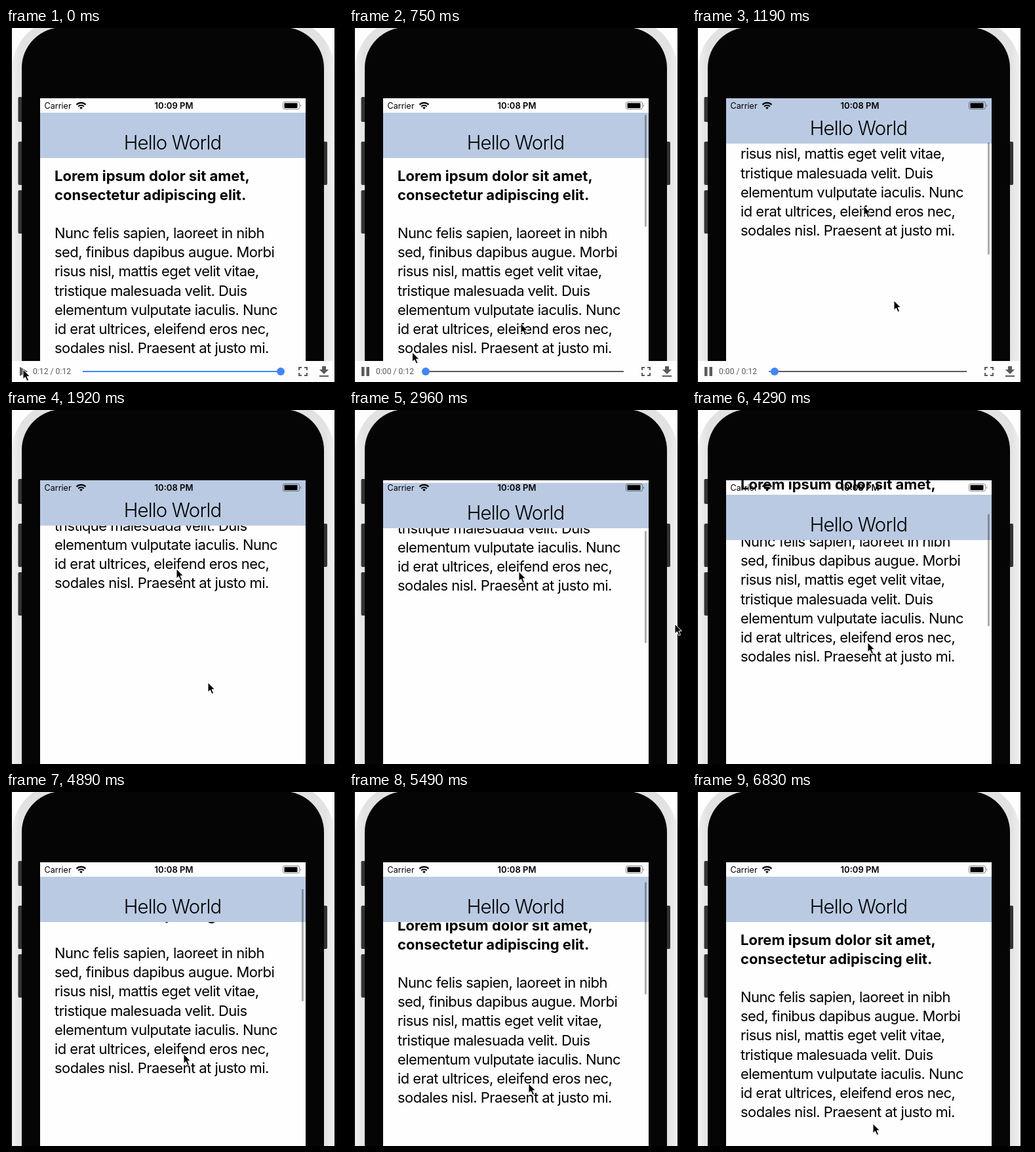
Write an HTML page that moves like this. It is 514 px wide and 539 px high and loops after 8 s.

```html
<!DOCTYPE html>
<html lang="en">
<head>
<meta charset="utf-8">
<title>Collapsing header</title>
<style>
  html, body { margin: 0; width: 100%; height: 100%; overflow: hidden; background: #000; }
  svg { display: block; width: 100%; height: 100%; }
  text { font-family: Inter, "Open Sans", sans-serif; font-optical-sizing: none; white-space: pre; }
  .body { font-size: 22px; letter-spacing: -.54px; }
  .bold { font-size: 22px; font-weight: 700; }
  .title { font-size: 29.3px; font-weight: 350; letter-spacing: -.8px; text-anchor: middle; }
  .carrier { font-size: 12.6px; }
  .clock { font-size: 13px; font-weight: 600; text-anchor: middle; }
  .time { font: 12.2px Roboto, sans-serif; fill: #5a5a5a; }
</style>
</head>
<body>
<svg viewBox="0 0 514 539">
  <defs>
    <linearGradient id="rim">
      <stop offset="0" stop-color="#f1f1f1"/>
      <stop offset=".03" stop-color="#e2e2e2"/>
      <stop offset=".97" stop-color="#e2e2e2"/>
      <stop offset="1" stop-color="#f1f1f1"/>
    </linearGradient>
    <clipPath id="screen"><path d="M52 107H457V539H52z"/></clipPath>
    <path id="arrow" d="M0 0V14.5L3.4 11.4L6 17.4L8.6 16.3L6 10.4H10.4z"
      fill="#000" stroke="#fff" stroke-width="1" stroke-linejoin="round"/>
  </defs>

  <path fill="#fefefe" d="M9 0H501V539H9z"/>
  <rect x="9" y="-14" width="492" height="700" rx="78" fill="url(#rim)"/>
  <g fill="#333">
    <rect x="18.5" y="105" width="8" height="38" rx="2"/>
    <rect x="18.5" y="173" width="8" height="66" rx="2"/>
    <rect x="18.5" y="247" width="8" height="66" rx="2"/>
    <rect x="482" y="173" width="8" height="66" rx="2"/>
  </g>
  <rect x="24" y="-1" width="461" height="700" rx="62" fill="#050505"/>

  <g clip-path="url(#screen)">
    <path fill="#fefefe" d="M52 107H457V539H52z"/>
    <g id="page"></g>
    <g id="header">
      <path fill="#bacae2" d="M52 107H457V176H52z"/>
      <text class="title" x="254" y="163">Hello World</text>
    </g>
    <text class="carrier" x="58.5" y="123">Carrier</text>
    <g fill="none" stroke="#000" stroke-width="2.2">
      <path d="M107.5 116.8A10 10 0 0 1 121.5 116.8"/>
      <path d="M110.2 119.5A6.2 6.2 0 0 1 118.8 119.5"/>
      <path d="M114.5 123.8L112.2 121.4A3.4 3.4 0 0 1 116.8 121.4z" fill="#000" stroke="none"/>
    </g>
    <text class="clock" id="clock" x="256" y="123"></text>
    <rect x="422.5" y="112.5" width="25" height="11" rx="2.5" fill="none" stroke="#000" stroke-opacity=".45"/>
    <rect x="424.5" y="114.2" width="20" height="7.8" rx="1"/>
    <path d="M449 116V120.5Q451 118.2 449 116z" fill-opacity=".55"/>
    <rect id="bar" x="451" width="2.8" height="171" rx="1.4" fill="#000" fill-opacity=".33"/>
  </g>
  <use id="finger" href="#arrow"/>

  <g id="controls">
    <path fill="#fefefe" d="M9 507H501V539H9z"/>
    <path id="button" fill="#5a5a5a"/>
    <text class="time" id="time" x="41" y="527"></text>
    <path stroke="#5a5a5a" stroke-width="2" d="M117 523H419"/>
    <path id="played" stroke="#4285f4" stroke-width="2"/>
    <circle id="knob" cy="523" r="6" fill="#4285f4"/>
    <path fill="none" stroke="#5a5a5a" stroke-width="2"
      d="M447 521V517H451M455 517H459V521M459 525V529H455M451 529H447V525"/>
    <path fill="#5a5a5a" d="M482 515H488V520H492L485 527L478 520H482zM478 529H492V531H478z"/>
  </g>
  <use id="mouse" href="#arrow"/>
</svg>

<script>
const $ = id => document.getElementById(id);
const set = (id, attrs) => {
  for (const name in attrs) $(id).setAttribute(name, attrs[name]);
};
const move = (id, x, y) => set(id, { transform: `translate(${x} ${y})` });
const show = (id, on) => set(id, { visibility: on ? "visible" : "hidden" });

const lines = [
  "Lorem ipsum dolor sit amet,", "consectetur adipiscing elit.", "",
  "Nunc felis sapien, laoreet in nibh", "sed, finibus dapibus augue. Morbi",
  "risus nisl, mattis eget velit vitae,", "tristique malesuada velit. Duis",
  "elementum vulputate iaculis. Nunc", "id erat ultrices, eleifend eros nec,",
  "sodales nisl. Praesent at justo mi."
];
$("page").innerHTML = lines.map((line, i) =>
  `<text class="${i < 2 ? "bold" : "body"}" x="74" y="${232.6 + i * 29.15}">${line}</text>`).join("");

// Keys are [step, value] pairs, linear in between.
const scrollKeys = [[1, 0], [2, 0], [3, 45], [5, 179], [6, 205], [7, 219], [8, 224], [13, 224],
  [14, 220], [18, 162], [23, 112], [25, 90], [31, 22], [32, 6], [33, 0]];
const fingerX = [[1, 262], [5, 262], [14, 259], [18, 262], [23, 268], [31, 274], [40, 276]];
const mouseX = [[0, 26], [1, 26], [5, 308], [11, 308], [14, 497]];
const mouseY = [[0, 520], [1, 520], [5, 415], [11, 415], [14, 326]];
const fade = [[1, 0], [2, 1], [8, 1], [9, .5], [10, 0], [11, 0], [12, 1], [35, 1], [38, 0]];

function at(keys, s) {
  const i = keys.findIndex(k => k[0] > s);
  if (i < 0) return keys[keys.length - 1][1];
  if (!i) return keys[0][1];
  const [a, from] = keys[i - 1], [b, to] = keys[i];
  return from + (to - from) * (s - a) / (b - a);
}

function stepAt(t) {
  if (t < 600) return 0;
  if (t < 2510) return Math.min(10, 1 + Math.floor((t - 592) / 147.5));
  return Math.min(40, 11 + Math.floor((t - 2490) / 149));
}

function fingerY(s, scroll) {
  if (s < 5) return 450 - scroll;
  if (s < 8) return at([[5, 271], [8, 242]], s);
  return s < 33 ? 466 - scroll : at([[33, 466], [34, 471], [40, 505]], s);
}

function draw() {
  const s = stepAt(performance.now() % 8000);
  const scroll = Math.round(at(scrollKeys, s));
  const drop = s < 13 ? Math.max(0, 22 - scroll) : Math.min(22, 224 - scroll);
  move("page", 0, -scroll);
  move("header", 0, drop);
  set("bar", { y: 132 + scroll * .236, opacity: at(fade, s) });
  $("clock").textContent = s && s < 36 ? "10:08 PM" : "10:09 PM";

  move("finger", Math.round(at(fingerX, s)), Math.round(fingerY(s, scroll)));
  show("finger", s > 0);
  move("mouse", at(mouseX, s), at(mouseY, s));
  show("mouse", s < 15);

  const knob = s ? 117 + Math.max(0, 9 + (s - 5) * 4.23) : 419;
  const seconds = Math.floor((knob - 117) / 302 * 12);
  show("controls", s < 9 || (s > 14 && s < 20));
  set("button", { d: s ? "M19 516H23.5V530H19zM26.5 516H31V530H26.5z" : "M21 516L33 523L21 530z" });
  $("time").textContent = `0:${String(seconds).padStart(2, "0")} / 0:12`;
  set("knob", { cx: knob });
  set("played", { d: `M117 523H${knob}` });
  requestAnimationFrame(draw);
}
draw();
</script>
</body>
</html>
```
